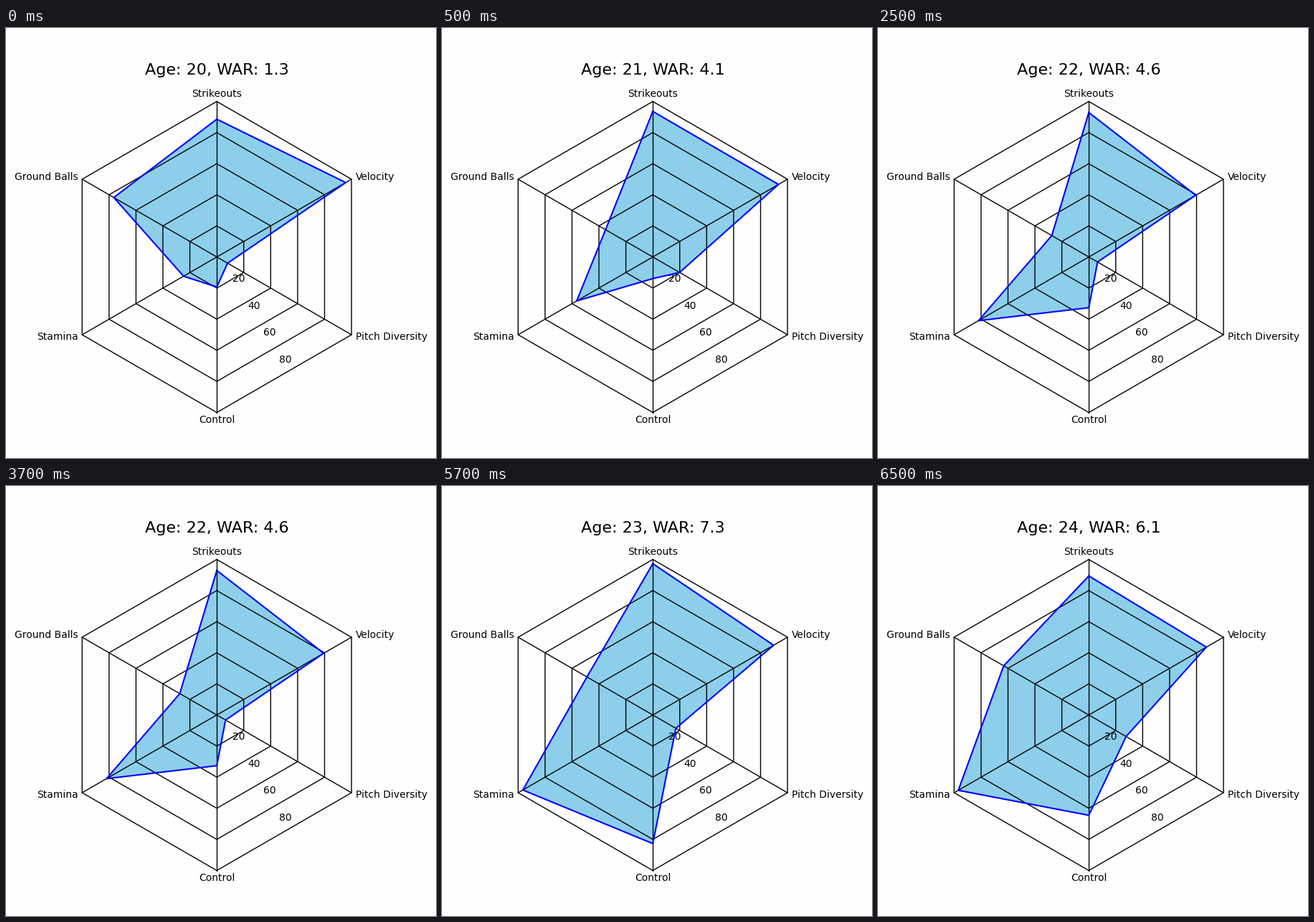
Animation of 600 by 600 pixels, one loop 8000 ms. Source, as a matplotlib script:

```python
import numpy as np
import matplotlib.pyplot as plt
from matplotlib.animation import FuncAnimation

SIZE, DPI = 600, 100
CX, CY, RADIUS = 294.15, 319.5, 217
INTERVAL, FRAMES = 500, 16
FIRST_AGE, STEPS_PER_AGE = 20, 4

# Percentile per season, clockwise from the top
STATS = {
    "Strikeouts": (88.6, 93.6, 92.9, 97.3, 89.4),
    "Velocity": (95.7, 93.3, 79.4, 89.7, 87.3),
    "Pitch Diversity": (8, 19.9, 6.5, 17.1, 27.7),
    "Control": (19.3, 13.9, 32.6, 82.7, 64.5),
    "Stamina": (24.7, 56.5, 81.9, 96.5, 96.9),
    "Ground Balls": (76.5, 35.1, 27.5, 48.9, 63.2),
}
WAR = (1.3, 4.1, 4.6, 7.3, 6.1)

plt.rcParams["font.family"] = "DejaVu Sans"
ANGLES = np.arange(6) * np.pi / 3
SEASONS = np.array(list(STATS.values())).T


def hexagon(values):
    """Closed outline in pixels for one value or six, on a 0-100 scale."""
    r = np.broadcast_to(values, 6) * RADIUS / 100
    points = np.column_stack([CX + r * np.sin(ANGLES), CY - r * np.cos(ANGLES)])
    return np.vstack([points, points[:1]])


def grid_line(points):
    ax.plot(*np.transpose(points), color="black", lw=1, zorder=2)


def label(x, y, text, align, size=10):
    return ax.text(x, y, text, size=size, ha=align, va="baseline", zorder=3)


fig = plt.figure(figsize=(SIZE / DPI, SIZE / DPI), dpi=DPI, facecolor="#fefefe")
ax = fig.add_axes([0, 0, 1, 1])
ax.set(xlim=(0, SIZE), ylim=(SIZE, 0))
ax.axis("off")

area, = ax.fill(*hexagon(0).T, color="#8dcfeb", lw=0, zorder=1)
outline, = ax.plot([], [], color="blue", lw=1.5, zorder=4)
title = label(CX, 65, "", "center", size=16)

for level in range(20, 101, 20):
    grid_line(hexagon(level))
    if level < 100:
        r = level * RADIUS / 100
        label(CX + r / 2, CY + r * np.sin(np.pi / 3) - 3.1, str(level), "left")

for name, angle, corner in zip(STATS, ANGLES, hexagon(100)):
    grid_line([(CX, CY), corner])
    side = int(np.sign(round(np.sin(angle), 6)))
    up = np.cos(angle)
    baseline = round(corner[1] + 4 - 10.5 * up * abs(up))
    label(corner[0] + 5.6 * side, baseline, name,
          {-1: "right", 0: "center", 1: "left"}[side])


def update(i):
    season = (i + STEPS_PER_AGE - 1) // STEPS_PER_AGE
    points = hexagon(SEASONS[season])
    area.set_xy(points)
    outline.set_data(*points.T)
    title.set_text(f"Age: {FIRST_AGE + season}, WAR: {WAR[season]}")
    return area, outline, title


anim = FuncAnimation(fig, update, frames=FRAMES, interval=INTERVAL, repeat=True)
plt.show()
```
